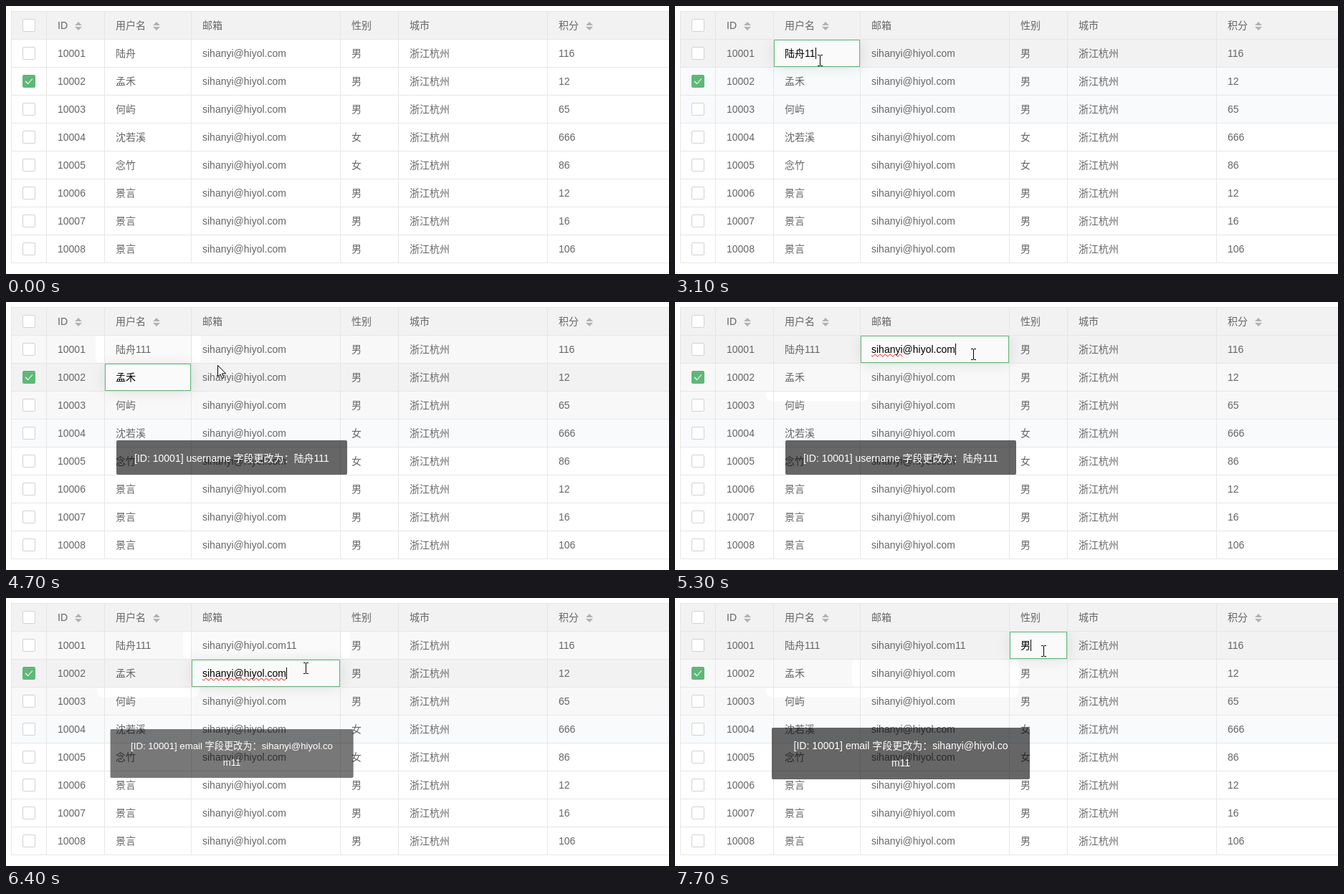
Write an HTML page that moves like this. It is 925 px wide and 374 px high and loops after 8000 ms.

```html
<!DOCTYPE html>
<html lang="zh">
<head>
<meta charset="utf-8">
<style>
  html, body { margin: 0; width: 100%; height: 100%; overflow: hidden; background: #fff; }
  #stage { position: relative; width: 925px; height: 374px; overflow: hidden; color: #666;
    font: 14px/38px "Liberation Sans", "Noto Sans CJK SC", "Noto Sans CJK", sans-serif; }
  #stage div, #stage svg { position: absolute; box-sizing: border-box; white-space: nowrap; }
  #head { left: 7px; top: 7px; width: 930px; height: 40px; background: #f2f2f2; border: 1px solid #e6e6e6; }
  #body { left: 0; top: 47px; width: 925px; height: 327px; overflow: hidden; }
  .row { left: 7px; width: 930px; height: 39px; border-bottom: 1px solid #e6e6e6; }
  .line { top: 7px; width: 1px; height: 352px; background: #e6e6e6; }
  .box { left: 23px; width: 18px; height: 18px; border: 1px solid #d2d2d2; border-radius: 2px; background: #fff; }
  .box.on { background: #5fb878; border-color: #5fb878; }
  .halo { background: #fafafa; border: solid #fff; border-width: 0 12px; border-radius: 5px; }
  .halo.low { background: #fff; border-radius: 0 0 10px 10px; }
  #edit { height: 38px; padding-left: 14px; line-height: 36px; color: #000; background: #fafafa;
    border: 1px solid #5fb878; box-shadow: 1px 1px 20px rgba(0, 0, 0, .1); }
  #edit u { text-decoration: underline wavy #f00 .7px; text-decoration-skip-ink: none; text-underline-offset: 1px; }
  #edit i { display: inline-block; width: 1px; height: 16px; margin-right: -1px; background: #000; vertical-align: -3px; }
  #toast { padding: 12px 0; line-height: 24px; color: #fff; text-align: center;
    background: rgba(0, 0, 0, .6); border-radius: 2px; }
  #toast b { font-family: "Noto Sans CJK TC", sans-serif; font-weight: 400; }
  #arrow, #beam { left: 0; top: 0; overflow: visible; }
</style>
</head>
<body>
<div id="stage">
  <div id="head"></div>
  <div id="body"></div>
  <div id="toast"></div>
  <svg id="arrow" width="13" height="20"><path d="M.5 .5V16.2L4.1 12.8L6.6 18.6L9 17.6L6.5 11.9H11.6Z" fill="#fff" stroke="#000"/></svg>
  <svg id="beam" width="7" height="16"><path d="M0 .5H3M4 .5H7M3.5 1V15M0 15.5H3M4 15.5H7" fill="none" stroke="#000"/></svg>
</div>
<script>
const LOOP = 8000, TICK = 100, ROW = 39, USER = 1, MAIL = 2, SEX = 3;
const $ = id => document.getElementById(id);
const stage = $('stage'), body = $('body'), toast = $('toast');
const cols = [56, 137, 258, 466, 547, 755, 960];
const local = 'sihanyi', domain = '@hiyol.com', mail = local + domain;
const people = [
  ['陆舟', '男', 116], ['孟禾', '男', 12], ['何屿', '男', 65], ['沈若溪', '女', 666],
  ['念竹', '女', 86], ['景言', '男', 12], ['景言', '男', 16], ['景言', '男', 106]
];

function add(parent, cls, style, html = '') {
  const el = document.createElement('div');
  el.className = cls;
  for (const k in style) el.style[k] = typeof style[k] === 'number' ? style[k] + 'px' : style[k];
  el.innerHTML = html;
  parent.append(el);
  return el;
}

// Header
const sorter = x => `<svg style="left:${x}px;top:14px" width="10" height="12"><path d="M0 5L5 0L10 5ZM0 7H10L5 12Z" fill="#b2b2b2"/></svg>`;
const layer = add(stage, '', { left: 0, top: 0 });
['ID', '用户名', '邮箱', '性别', '城市', '积分'].forEach((name, i) =>
  add(layer, '', { left: cols[i] + 16, top: 8 }, name));
add(layer, '', { left: 0, top: 8 }, [96, 205, 809].map(sorter).join(''));
add(layer, 'box', { top: 18 });

// Rows, halos, grid lines, cells
const rows = people.map((_, r) => add(body, 'row', { top: r * ROW }));
const halos = [
  [125, 147, 0, 3700, 4900], [127, 143, 2, 5200, LOOP], [247, 233, 0, 6300, 7200],
  [247, 233, 1, 7400, LOOP], [247, 233, 2, 7400, LOOP]
].map(([left, width, r, from, to]) => ({
  from, to,
  el: add(body, r === 2 ? 'halo low' : 'halo', { left, width, top: r * ROW, height: r === 2 ? 14 : 38 })
}));
[7, ...cols.slice(0, 6)].forEach(left => {
  add(body, 'line', { left, top: 0, height: 312 });
  add(layer, 'line', { left, height: 40 });
});
const check = '<svg style="left:2px;top:3px" width="12" height="10"><path d="M1 5L4.5 8.5L11 1.5" fill="none" stroke="#fff" stroke-width="1.1"/></svg>';
const cells = people.map(([name, sex, score], r) => {
  add(body, r === 1 ? 'box on' : 'box', { left: 23, top: r * ROW + 10 }, r === 1 ? check : '');
  return [10001 + r, name, mail, sex, '浙江杭州', score].map((text, c) =>
    add(body, '', { left: cols[c] + 16, top: r * ROW }, text));
});
const edit = add(body, '', {});
edit.id = 'edit';
stage.append(toast, $('arrow'), $('beam'));

// Text typed so far, given the moments of each key press
const typed = (t, keys) => '1'.repeat(keys.filter(k => t >= k).length);
const userKeys = [2900, 3100, 3200], mailKeys = [5700, 5800];

const edits = [
  { from: 1300, row: 0, col: USER, keys: userKeys, blink: 1300, html: people[0][0] },
  { from: 3700, row: 1, col: USER, blink: 3750, html: people[1][0] },
  { from: 5200, row: 0, col: MAIL, keys: mailKeys, blink: 5200, html: `<u>${local}</u>${domain}` },
  { from: 6300, row: 1, col: MAIL, blink: 6300, html: `<u>${mail}</u>` },
  { from: 7400, row: 0, col: SEX, blink: 7400, html: '男' }
];
const notice = (field, value) => `[ID: 10001] ${field} 字段更改为<b>：</b>${value}`;
const toasts = [
  { from: 3620, box: [154, 193, 322, 48], html: notice('username', people[0][0] + '111') },
  { from: 6220, box: [135, 181, 360, 72], html: notice('email', mail.slice(0, -1) + '<br>m11') }
];
const path = [
  [400, 908, 137], [1100, 183, 49], [1200, 206, 58], [1300, 209, 64], [2400, 209, 64],
  [2500, 206, 72], [2700, 206, 72], [2800, 202, 76], [3200, 202, 76], [3400, 203, 98],
  [3700, 205, 102], [4000, 205, 102], [4150, 230, 140], [4300, 265, 172], [4500, 290, 130],
  [4700, 296, 88], [4800, 296, 88], [5200, 416, 73], [5900, 416, 73], [6100, 417, 96],
  [6200, 417, 96], [6300, 418, 98], [6900, 418, 98], [7300, 514, 74], [LOOP, 514, 74]
];
const pop = toast.animate(
  [{ opacity: 0, transform: 'scale(.5)' }, { opacity: 1, transform: 'scale(1)' }],
  { duration: 300, easing: 'ease', fill: 'both' });
pop.pause();

const latest = (list, t) => list.filter(e => t >= e.from).pop();
const show = (el, on) => { el.style.display = on ? '' : 'none'; };

function pointer(t) {
  const i = path.findIndex(p => p[0] > t);
  if (i < 1) return null;
  const [t0, x0, y0] = path[i - 1], [t1, x1, y1] = path[i];
  const k = (t - t0) / (t1 - t0);
  return { x: Math.round(x0 + (x1 - x0) * k), y: Math.round(y0 + (y1 - y0) * k) };
}
const rowAt = p => p ? Math.floor((p.y - 46) / ROW) : -1;

// Rows already crossed by the pointer keep a faint tint
function paintRows(t, hover) {
  const seen = new Set();
  for (let u = 400; u <= t; u += TICK) seen.add(rowAt(pointer(u)));
  rows.forEach((el, r) => {
    const tint = r === 3 || t < 3200 ? '#f8fafc' : '#f8f8f8';
    el.style.background = r === hover ? '#f2f2f2' : seen.has(r) ? tint : '#fff';
  });
}

function paintEdit(t, e) {
  show(edit, e);
  if (!e) return;
  const keys = e.keys || [];
  const blink = keys.filter(k => t >= k).pop() || e.blink;
  const caret = (t - blink) % 1000 < 500 ? '<i></i>' : '';
  edit.style.left = cols[e.col] + 1 + 'px';
  edit.style.top = e.row * ROW + 'px';
  edit.style.width = cols[e.col + 1] - cols[e.col] - 1 + 'px';
  edit.innerHTML = e.html + typed(t, keys) + caret;
}

function paintToast(t, m) {
  show(toast, m);
  if (!m) return;
  ['left', 'top', 'width', 'height'].forEach((k, i) => { toast.style[k] = m.box[i] + 'px'; });
  toast.innerHTML = m.html;
  pop.currentTime = Math.min(t - m.from, 300);
}

function paintPointer(p, e) {
  const text = p && e && rowAt(p) === e.row && p.x > cols[e.col] && p.x < cols[e.col + 1];
  show($('arrow'), p && !text);
  show($('beam'), text);
  if (!p) return;
  $('arrow').style.transform = `translate(${p.x - 1}px,${p.y}px)`;
  $('beam').style.transform = `translate(${p.x - 3}px,${p.y - 8}px)`;
}

function draw(t) {
  const p = pointer(t), e = latest(edits, t);
  paintRows(t, rowAt(p));
  halos.forEach(h => show(h.el, t >= h.from && t < h.to));
  cells[0][USER].textContent = people[0][0] + (t >= 3700 ? typed(t, userKeys) : '');
  cells[0][MAIL].textContent = mail + (t >= 6300 ? typed(t, mailKeys) : '');
  paintEdit(t, e);
  paintToast(t, latest(toasts, t));
  paintPointer(p, e);
}

const start = performance.now();
let last = -1;
function loop() {
  const t = Math.floor((performance.now() - start) % LOOP / TICK) * TICK;
  if (t !== last) draw(last = t);
  requestAnimationFrame(loop);
}
loop();
</script>
</body>
</html>
```
